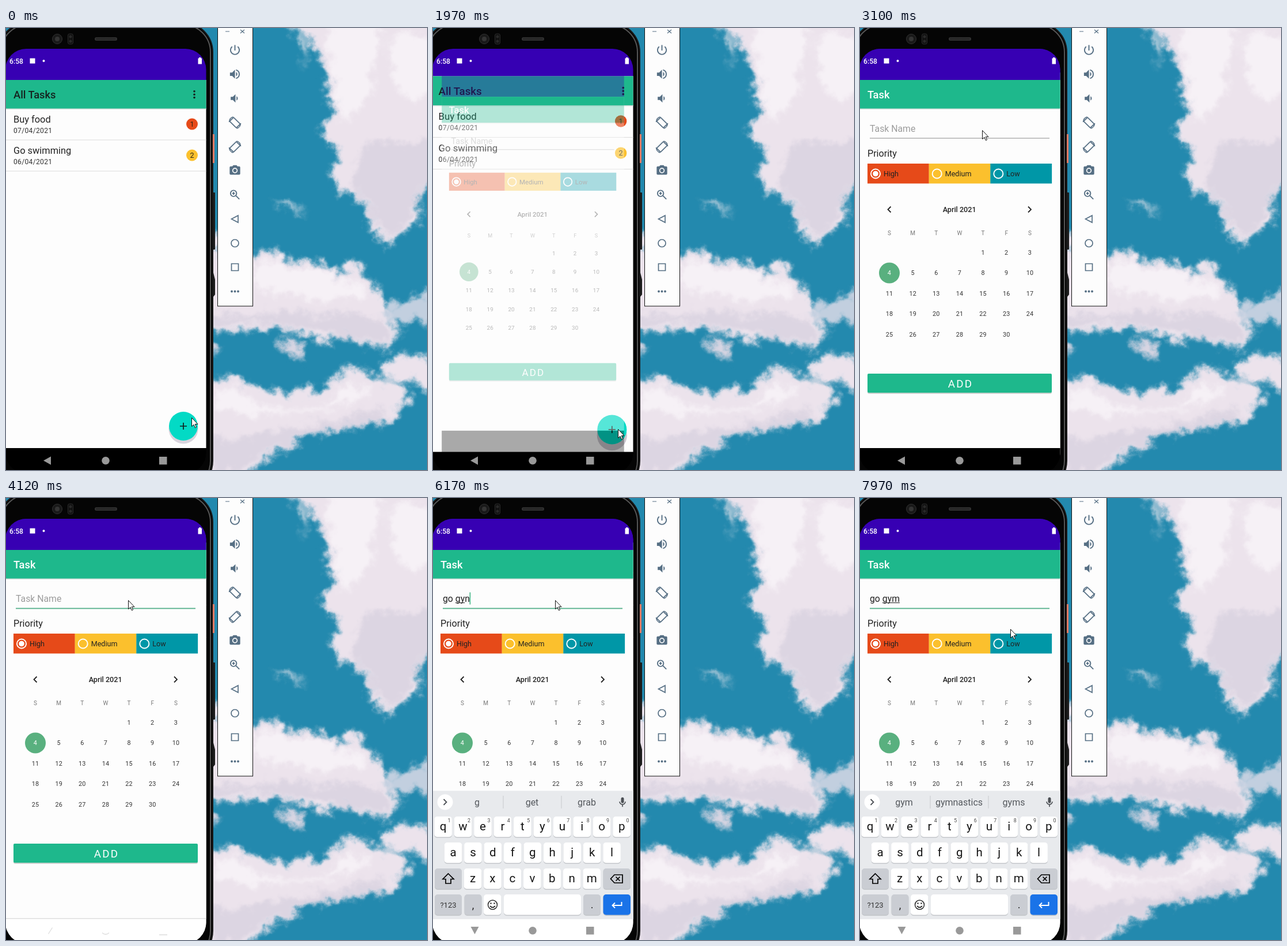
An HTML page for the animation above (8000 ms loop, 731 px wide and 766 px high).

```html
<!DOCTYPE html>
<html lang="en">
<head>
<meta charset="utf-8">
<title>Task app demo</title>
<style>
html, body { margin: 0; width: 100%; height: 100%; overflow: hidden; background: #2389ae; }
svg { display: block; width: 731px; height: 766px; font-family: Roboto, sans-serif; }
text { white-space: pre; }
.mid { text-anchor: middle; }
.med { font-weight: 500; }
.line { fill: none; stroke: currentColor; }
.tools { color: #566f84; }
.strip { color: #4c5055; }
</style>
</head>
<body>
<svg id="stage" viewBox="0 0 731 766"></svg>
<script>
const range = n => [...Array(n).keys()];
const rect = (x, y, w, h, fill, extra = '') =>
  `<rect x="${x}" y="${y}" width="${w}" height="${h}" fill="${fill}" ${extra}/>`;
const disc = (x, y, r, fill, extra = '') =>
  `<circle cx="${x}" cy="${y}" r="${r}" fill="${fill}" ${extra}/>`;
const path = (d, fill, extra = '') => `<path d="${d}" fill="${fill}" ${extra}/>`;
const stroke = (d, width = 2, extra = '') =>
  `<path class="line" d="${d}" stroke-width="${width}" ${extra}/>`;
const text = (x, y, size, str, fill = '#222', extra = '') =>
  `<text x="${x}" y="${y}" font-size="${size}" fill="${fill}" ${extra}>${str}</text>`;
const mid = (x, y, size, str, fill, extra = '') => text(x, y, size, str, fill, `class="mid" ${extra}`);
const group = (id, body, extra = '') => `<g id="${id}" ${extra}>${body}</g>`;
// Places a 24-unit icon by its centre.
const icon = (x, y, size, body) =>
  `<g transform="translate(${x} ${y}) scale(${size / 24}) translate(-12 -12)">${body}</g>`;

const GREEN = '#1eb88c', PURPLE = '#3700b3', PAPER = '#fdfdfd';
const RED = '#e64a19', AMBER = '#fbc02d', TEAL = '#0097a7';

function sky() {
  const cloud = '#ece3ec', shade = '#dcd5e2', light = '#f6f1f6';
  return rect(0, 0, 731, 766, '#2389ae') +
    `<g filter="url(#ragged)">` +
    path('M490 -40V-5L525 18L541 38L548 66L563 90L553 112L570 130L562 152L545 185L569 202L576 228L562 255L577 286L610 291L626 312L630 348L666 377L690 350L718 338L716 302L738 268L780 260V-40Z', cloud) +
    path('M630 195L690 200L780 190V250L725 275L712 305L700 330L666 362L634 335L630 300L600 275L610 230Z', shade) +
    path('M560 -40H640L655 30L630 75L640 110L600 150L590 170L575 130L568 110L572 85L555 40Z', light) +
    path('M665 20L700 5L780 40V110L700 125L670 85Z', light) +
    path('M320 372L365 350L372 395L429 393L450 385L480 391L500 405L522 398L555 411L580 425L606 400L622 420L640 447L655 476L672 512L685 525L665 556L620 550L590 535L540 545L520 530L470 522L400 527L320 520Z', cloud) +
    path('M320 490L420 500L480 488L540 500L590 490L640 505L672 525L658 548L610 538L560 528L520 520L450 512L320 515Z', shade) +
    path('M432 410L470 400L500 420L540 415L590 440L615 440L630 465L580 470L540 475L500 460L432 455Z', light) +
    path('M650 494L680 472L780 450V500L700 512L668 510Z', '#c2cfdf') +
    path('M470 556L490 535L512 546L518 575L497 568ZM340 540L371 558L340 570Z', '#d8d5e2') +
    path('M320 614L395 603L430 620L480 633L520 624L545 632L572 606L592 584L614 590L642 606L682 614L702 636L673 680L620 690L570 700L520 706L490 730L450 745L425 768L410 800H370L320 720Z', cloud) +
    path('M320 705L400 715L450 700L520 688L580 680L630 662L665 665L650 680L570 696L520 702L488 725L440 740L400 770H370Z', shade) +
    path('M365 630L400 622L440 655L500 662L560 655L590 615L635 625L610 645L540 665L440 672L365 660Z', light) +
    path('M645 590L672 570L710 566L780 582V628H745L700 614L655 606Z', cloud) +
    path('M494 0L526 26L514 72L517 34ZM462 298L490 303L525 320L490 313Z', '#c9d6e2') +
    `</g>`;
}

function phone() {
  return rect(-13, -10, 372, 812, '#050505', 'rx="52" stroke="#1a1a1a" stroke-width="2"') +
    rect(-9, -6, 364, 804, 'none', 'rx="48" stroke="#555" stroke-width="2"') +
    rect(359, 184, 3, 50, '#e07a65') +
    rect(359, 285, 4, 99, '#1b1b1b', 'rx="1"') +
    path('M359 420L363 436V462L359 467Z', '#1b1b1b') +
    disc(89, 19, 8.5, '#191919', 'stroke="#303030"') + disc(89, 19, 4, '#343434') +
    rect(107.5, 10, 9, 18, '#111', 'rx="3" stroke="#2b2b2b"') +
    disc(112, 15, 2.5, '#292929') + disc(112, 23, 2.5, '#292929') +
    rect(154, 16, 39, 6, '#303030', 'rx="3"') +
    stroke('M157 19H190', 3, 'stroke-dasharray="1 1" style="color:#1a1a1a"');
}

function emulatorBar() {
  const x = 397.5;
  const speaker = (dx, waves) => path(`M${3 + dx} 9v6h4l5 5V4l-5 5z`, 'currentColor') + waves;
  const rotate = '<rect class="line" x="7" y="3.5" width="10" height="17" rx="1" stroke-width="1.8" transform="rotate(-45 12 12)"/>' +
    stroke('M1.5 11C2 6 5 2.5 9 1.5M22.5 13C22 18 19 21.5 15 22.5', 1.6);
  return rect(367.5, -2, 61, 484, PAPER, 'stroke="#111"') + '<g class="tools">' +
    stroke('M381 6H388M407 3L414 9M414 3L407 9', 1.2) +
    icon(x, 38, 23, stroke('M12 3V13M7 6A8 8 0 1 0 17 6')) +
    icon(x, 80, 23, speaker(0, stroke('M14 4.3A8 8 0 0 1 14 19.7') + path('M14 8A4.5 4.5 0 0 1 14 16Z', 'currentColor'))) +
    icon(x, 122, 22, speaker(1, path('M15 8A4.5 4.5 0 0 1 15 16Z', 'currentColor'))) +
    icon(x, 164, 23, rotate) +
    icon(x, 206, 23, `<g transform="translate(24 0) scale(-1 1)">${rotate}</g>`) +
    icon(x, 247, 22, path('M9 2L7 4H4A2 2 0 0 0 2 6V18A2 2 0 0 0 4 20H20A2 2 0 0 0 22 18V6A2 2 0 0 0 20 4H17L15 2Z', 'currentColor') +
      disc(12, 12, 4.2, 'none', 'stroke="#fdfdfd" stroke-width="1.8"')) +
    icon(x, 289, 23, stroke('M15 9.5A5.5 5.5 0 1 1 4 9.5A5.5 5.5 0 1 1 15 9.5M14 14L20 20M7 9.5H12M9.5 7V12')) +
    stroke('M403 325V337L391.5 331Z', 1.7) +
    stroke('M404 373A6.5 6.5 0 1 1 391 373A6.5 6.5 0 1 1 404 373', 1.7) +
    stroke('M391.5 408.5H403.5V420.5H391.5Z', 1.7) +
    range(3).map(i => disc(392 + i * 5.5, 456.5, 1.9, 'currentColor')).join('') + '</g>';
}

function appFrame(title, color) {
  return rect(-1, 0, 349, 91, PURPLE) + rect(-1, 90, 349, 638, PAPER) +
    rect(-1, 728, 349, 60, '#000') + rect(-1, 139, 349, 2, '#cfdcd8') +
    rect(-1, 90, 349, 49.5, GREEN) + text(13, 122, 18.3, title, color, 'class="med"');
}

function listScreen() {
  const row = (y, name, date, color, rank) =>
    text(13, y + 24, 16.4, name) +
    text(13, y + 42, 12.1, date, '#333', 'letter-spacing=".3"') +
    disc(323, y + 26.5, 10, color) + mid(323, y + 31, 12.5, rank, '#2a2412') +
    rect(-1, y + 53.5, 349, 1, '#dcdcdc');
  return appFrame('All Tasks', '#15231f') +
    range(3).map(i => disc(327, 109.8 + i * 5.4, 1.8, '#15231f')).join('') +
    row(140, 'Buy food', '07/04/2021', RED, 1) +
    row(194, 'Go swimming', '06/04/2021', AMBER, 2) +
    disc(308, 695, 25.5, '#d9d4dd', 'id="shadow"') +
    disc(308, 690, 25, '#03dac5') + disc(308, 690, 25, '#000', 'id="ripple"') +
    stroke('M302 690H314M308 684V696', 1.7, 'style="color:#12211f"');
}

function calendar() {
  const colX = i => 51 + 40.65 * i;
  const days = range(30).map(i => {
    const cell = i + 4, chosen = i === 3;
    const x = colX(cell % 7), y = 389 + 35.5 * Math.floor(cell / 7);
    return (chosen ? disc(x, y, 18, '#59b07f') : '') +
      mid(x, y + 3.9, 10.8, i + 1, chosen ? '#fff' : '#333', 'letter-spacing=".2"');
  });
  return stroke('M53.5 309.5L48.5 314.5L53.5 319.5M292 309.5L297 314.5L292 319.5', 1.8, 'style="color:#222"') +
    text(172.7, 319, 12.6, 'April 2021', '#222', 'class="mid med"') +
    [...'SMTWTFS'].map((d, i) => mid(colX(i), 358.8, 10, d, '#777')).join('') + days.join('');
}

function taskScreen() {
  const option = (i, name, color) => {
    const x = 13 + i * 106.67;
    return rect(x, 235, 106.8, 34.5, color) +
      disc(x + 14, 252.5, 8, 'none', 'stroke="#fff" stroke-width="1.9"') +
      (i ? '' : disc(x + 14, 252.5, 4.8, '#fff')) + text(x + 28, 257, 12.6, name);
  };
  return appFrame('Task', '#fff') +
    rect(17, 190.5, 312, 1, '#8c8c8c', 'id="rule"') +
    text(17, 180, 15.8, 'Task Name', '#9c9c9c', 'id="hint"') +
    text(17, 180, 15.8, '', '#222', 'id="entry"') +
    rect(0, 181, 0, 1.1, '#333', 'id="underline"') +
    rect(16.5, 163.5, 1.6, 21, '#3fb585', 'id="caret"') +
    text(13, 223, 16.1, 'Priority') +
    option(0, 'High', RED) + option(1, 'Medium', AMBER) + option(2, 'Low', TEAL) +
    calendar() +
    rect(13, 600.5, 320, 33.5, '#c9cfcd', 'rx="3"') + rect(13, 599, 320, 33, GREEN, 'rx="2"') +
    mid(174.5, 623, 18.8, 'ADD', '#fff', 'letter-spacing="2.2"');
}

function keyboard() {
  const GREY = '#cacdd3';
  const key = (x, y, w, fill = '#fff') =>
    rect(x, y + 1, w, 36, '#c3c6ca', 'rx="5"') + rect(x, y, w, 35.5, fill, 'rx="5"');
  const row = (letters, x, y, w = 34.45) => [...letters].map((c, i) =>
    key(x + i * w - 15.3, y, 30.6) + mid(x + i * w, y + 24, 20.5, c, '#151515')).join('');
  const round = d => disc(21, 527, 13.5, '#fff') + stroke(d, 1.8);
  const tools = round('M23.5 522L18.5 527L23.5 532') +
    icon(67, 527, 20, stroke('M15.5 9.5A6 6 0 1 1 3.5 9.5A6 6 0 1 1 15.5 9.5M14 14L21 21', 2.3)) +
    icon(117, 527, 19, stroke('M3 3H21V14L14 21H3ZM14 21V14H21M7 13Q10 17 13 14', 2.2) + disc(8, 9, 1.5, 'currentColor') + disc(16, 9, 1.5, 'currentColor')) +
    mid(166, 532, 13, 'GIF', '#4c5055', 'font-weight="800"') +
    icon(217, 527, 19, stroke('M4 4H20V22H4ZM8 4V8H16V4M8 12H16M8 16H14', 2.2) + disc(12, 3, 2.2, 'currentColor')) +
    rect(247.5, 517, 1, 20, '#c8cace') +
    range(3).map(i => disc(273.5 + i * 5.5, 527, 1.8, 'currentColor')).join('');
  const words = round('M18.5 522L23.5 527L18.5 532') +
    rect(121.5, 516, 1, 22, '#c8cace') + rect(222.5, 516, 1, 22, '#c8cace') +
    [76.5, 172, 267].map(x => mid(x, 533, 16, '', '#54585d', 'data-word')).join('');
  return rect(-1, 507.5, 349, 223, '#e8eaed') + '<g class="strip">' +
    group('tools', tools) + group('words', words) +
    icon(329, 527, 20, path('M12 14A3 3 0 0 0 15 11V5A3 3 0 0 0 9 5V11A3 3 0 0 0 12 14Z', 'currentColor') + stroke('M6 11A6 6 0 0 0 18 11M12 17V22')) + '</g>' +
    row('qwertyuiop', 17.6, 552) +
    [...'1234567890'].map((c, i) => mid(28 + i * 34.45, 561.5, 8.8, c, '#444')).join('') +
    row('asdfghjkl', 35, 597) + row('zxcvbnm', 69, 642) +
    key(3, 642, 47, GREY) + stroke('M26.5 651L36 660.5H31V668H22V660.5H17Z', 1.7) +
    key(295.5, 642, 47.5, GREY) + stroke('M315 653H329V667H315L308.5 660ZM317.5 656.5L324.5 663.5M324.5 656.5L317.5 663.5', 1.7) +
    key(3, 687, 47, GREY) + mid(26.5, 710, 13, '?123', '#333') +
    key(54.5, 687, 30, GREY) + mid(69.5, 712, 18, ',', '#222') +
    key(88, 687, 30.5) + disc(103.5, 705, 8, 'none', 'stroke="#333" stroke-width="1.6"') +
    disc(100.5, 702.5, 1.3, '#333') + disc(106.5, 702.5, 1.3, '#333') + stroke('M99 707Q103.5 712 108 707', 1.6) +
    key(123, 687, 134) + key(261, 687, 30, GREY) + mid(276, 711, 18, '.', '#222') +
    key(295.5, 687, 47.5, '#1a73e8') + stroke('M327.5 700V706H312M316 701.5L311.5 706L316 710.5', 1.9, 'style="color:#fff"');
}

function navBar() {
  const homeAndRecents = disc(173, 749.7, 6.8, '#999') + rect(266, 743, 13.5, 13.5, '#999');
  const bare = rect(-1, 728, 349, 60, '#fff') + rect(-1, 728, 349, 1.5, '#dedede');
  return group('navDark', path('M78 742.5V757L65 749.7Z', '#999') + homeAndRecents) +
    group('navBare', bare + stroke('M73.5 755.5L80.5 744.5M167 753.5Q173 759 179 753.5M266 757H280', 1.3, 'style="color:#ddd"')) +
    group('navLight', bare + path('M65.5 743H79.5L72.5 756Z', '#999') + homeAndRecents);
}

const statusBar = text(6, 62, 12.2, '6:58', '#fff', 'class="med"') +
  rect(41.5, 52.5, 9, 9, '#fff') + disc(65.5, 57, 2, '#fff') +
  path('M333.5 52.5H335V51H338.5V52.5H340V62.5H333.5Z', '#fff');

const stage = document.getElementById('stage');
stage.innerHTML = `<defs>
  <clipPath id="screen"><rect x="-1" y="36" width="348.5" height="736" rx="36"/></clipPath>
  <clipPath id="aboveNav"><rect x="-1" y="36" width="349" height="693.5"/></clipPath>
  <filter id="ragged" filterUnits="userSpaceOnUse" x="320" y="-40" width="460" height="846" color-interpolation-filters="sRGB">
    <feGaussianBlur in="SourceGraphic" stdDeviation="5" result="soft"/>
    <feTurbulence type="fractalNoise" baseFrequency=".05" numOctaves="4" seed="4"/>
    <feDisplacementMap in="soft" scale="30" xChannelSelector="R" yChannelSelector="G"/>
  </filter></defs>` +
  sky() + phone() +
  `<g clip-path="url(#screen)">` + group('list', listScreen()) + group('task', taskScreen()) +
  navBar() + `<g clip-path="url(#aboveNav)">${group('keys', keyboard())}</g>` + statusBar + `</g>` +
  emulatorBar() +
  path('M.5 .5V15.5L4 12.4L6.4 17.8L8.6 16.8L6.3 11.6H11Z', '#fff', 'id="pointer" stroke="#111"');

// Each step changes only the named parts of the state.
const start = {
  pointer: [322, 675], ripple: 0, raised: 0, listScale: 1, taskScale: .907, taskAlpha: 0,
  focus: false, caret: false, nav: 'navDark', drop: 240, entry: '', marked: 0, words: null
};
const steps = [
  [0, {}],
  [150, { pointer: [321, 695] }],
  [710, { ripple: .1, raised: 2 }],
  [830, { ripple: .16, raised: 5 }],
  [980, { ripple: 0 }],
  [1970, { listScale: 1.021, taskAlpha: .33 }],
  [2090, { listScale: 1.04, taskScale: .975, taskAlpha: .9 }],
  [2240, { taskScale: 1, taskAlpha: 1 }],
  [2550, { pointer: [236, 420] }],
  [2680, { pointer: [164, 214] }],
  [2830, { pointer: [178, 198] }],
  [2980, { pointer: [200, 183] }],
  [3100, { pointer: [212, 177] }],
  [3380, { focus: true, caret: true }],
  [3970, { nav: 'navBare' }],
  [4120, { caret: false }],
  [4270, { drop: 70 }],
  [4390, { drop: 0 }],
  [4820, { nav: 'navLight' }],
  [5250, { caret: true }],
  [5370, { entry: 'g', words: ['g', 'get', 'good'] }],
  [5490, { entry: 'go', words: ['go', 'good', 'going'] }],
  [5770, { entry: 'go ', words: ['to', 'back', 'ahead'] }],
  [5890, { entry: 'go g', marked: 1, words: ['g', 'get', 'grab'] }],
  [6170, { entry: 'go gyn', marked: 2 }],
  [6320, { entry: 'go gynm', marked: 3, words: ['gyn', 'gym', 'gun'] }],
  [6600, { marked: 4, words: ['gynm', 'gym', 'gymnastic'] }],
  [6750, { entry: 'go gyn', marked: 3 }],
  [6870, { entry: 'go gy', marked: 2, words: ['gy', 'gym', 'gymnastic'] }],
  [6990, { entry: 'go gym' }],
  [7110, { words: ['gym', 'gyms', 'gymnast'] }],
  [7390, { marked: 3, words: ['gym', 'gymnastics', 'gyms'] }],
  [7830, { caret: false, pointer: [262, 190] }],
  [7970, { pointer: [261, 227] }]
];
let merged = start;
const states = steps.map(([at, change]) => ({ ...(merged = { ...merged, ...change }), at }));

const el = Object.fromEntries([...stage.querySelectorAll('[id]')].map(e => [e.id, e]));
const wordSlots = stage.querySelectorAll('[data-word]');
const set = (e, attrs) => Object.entries(attrs).forEach(([k, v]) => e.setAttribute(k, v));
const show = (e, on) => set(e, { visibility: on ? 'visible' : 'hidden' });
const zoom = (e, s, x, y) =>
  set(e, { transform: `translate(${x} ${y}) scale(${s}) translate(${-x} ${-y})` });

function render(s) {
  set(el.pointer, { transform: `translate(${s.pointer})` });
  set(el.ripple, { opacity: s.ripple });
  set(el.shadow, { cy: 695 + s.raised, fill: s.raised ? '#cac6ce' : '#d9d4dd' });
  zoom(el.list, s.listScale, 173.5, 405);
  zoom(el.task, s.taskScale, 173, 404);
  set(el.task, { opacity: s.taskAlpha });
  set(el.rule, s.focus ? { height: 1.8, fill: '#55b08a' } : { height: 1, fill: '#8c8c8c' });
  show(el.hint, !s.entry);
  el.entry.textContent = s.entry;
  const width = s.entry ? el.entry.getComputedTextLength() : 0;
  show(el.caret, s.caret);
  set(el.caret, { x: 16.7 + width });
  const from = s.marked ? el.entry.getSubStringLength(0, 3) : 0;
  const length = s.marked ? el.entry.getSubStringLength(3, s.marked) : 0;
  set(el.underline, { x: 17 + from, width: length });
  ['navDark', 'navBare', 'navLight'].forEach(id => show(el[id], id === s.nav));
  set(el.keys, { transform: `translate(0 ${s.drop})` });
  show(el.tools, !s.words);
  show(el.words, s.words);
  wordSlots.forEach((slot, i) => { slot.textContent = s.words ? s.words[i] : ''; });
}

let shown;
const begin = performance.now();
function tick() {
  const time = (performance.now() - begin) % 8000;
  const state = states.findLast(s => s.at <= time);
  if (state !== shown) render(shown = state);
  requestAnimationFrame(tick);
}
tick();
</script>
</body>
</html>
```
